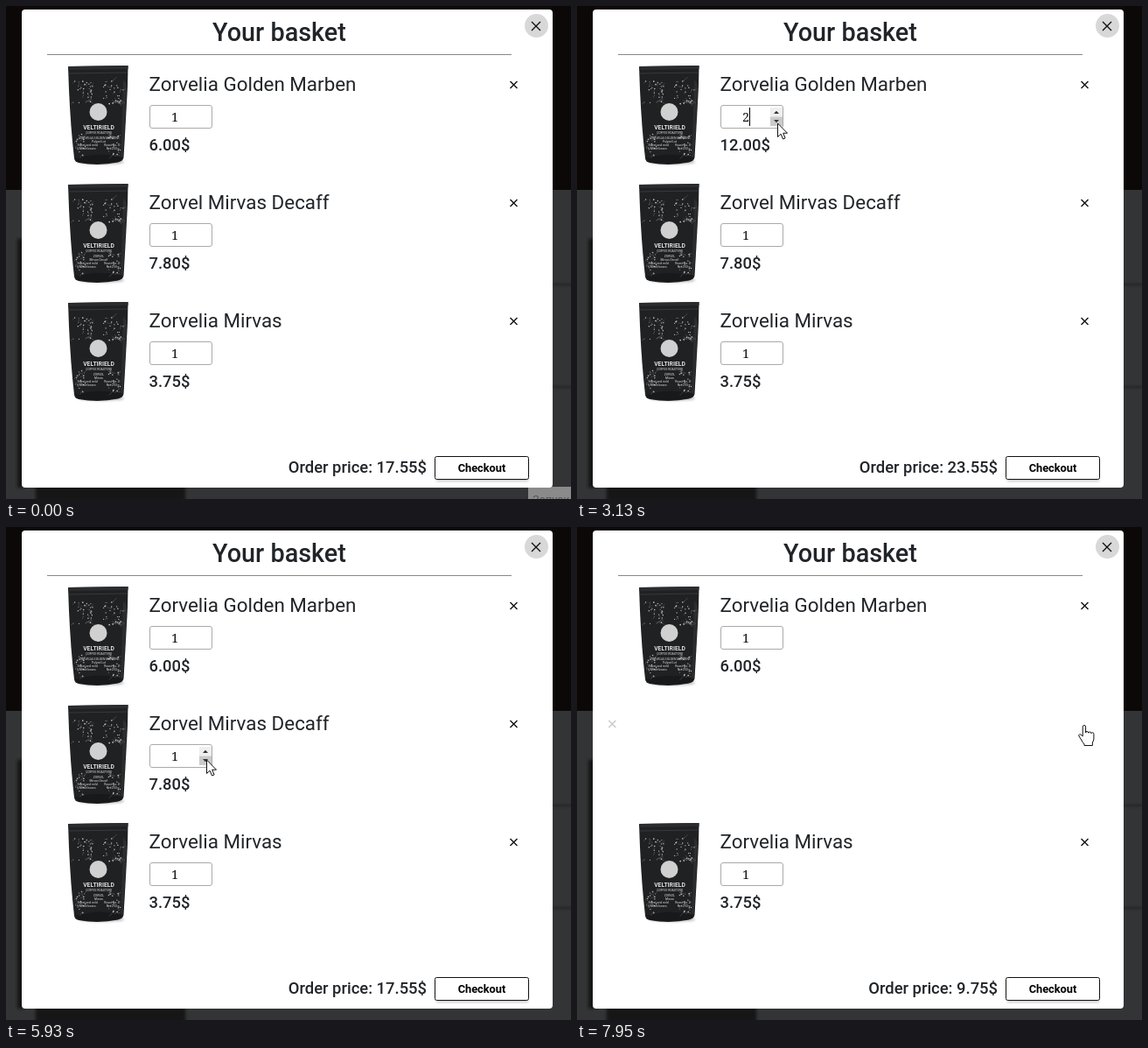
Recreate the animation shown at these times as an HTML page. Size 646x563 px, loop 7990 ms.

```html
<!DOCTYPE html>
<html lang="en">
<head>
<meta charset="utf-8">
<style>
  html, body { margin: 0; width: 100%; height: 100%; overflow: hidden; background: #323435; }
  svg { display: block; font-family: Roboto, sans-serif; fill: #212529; }
  .title { font-size: 28.8px; font-weight: 500; text-anchor: middle; }
  .name { font-size: 22.4px; }
  .price { font-size: 18.4px; font-weight: 500; }
  .qty { font: 14.4px "Noto Serif", serif; text-anchor: middle; fill: #111; }
  .button { font-size: 12.8px; font-weight: 700; text-anchor: middle; fill: #000; }
  .end { text-anchor: end; }
  .cross { stroke: #111; stroke-width: 1.4; fill: none; }
  .label { fill: #ddd; text-anchor: middle; font-size: 3.4px; }
  .brand { font-size: 6.8px; font-weight: 700; }
  .pointer { fill: #fff; stroke: #111; stroke-linejoin: round; }
</style>
</head>
<body>
<svg id="stage" width="646" height="563" viewBox="0 0 646 563"></svg>
<script>
const LOOP = 7990, BLINK = 520, REMOVE = 7500;
const items = [
  { name: 'Zorvelia Golden Marben', label: ['ZORVELIA GOLDEN MARBEN', 'Pulped Lot'], price: 6,
    steps: [[0, 1], [1340, 2], [1890, 3], [2230, 4], [2780, 3], [3080, 2], [3380, 1]] },
  { name: 'Zorvel Mirvas Decaff', label: ['ZORVEL', 'Mirvas Decaff'], price: 7.8,
    steps: [[0, 1], [4550, 2], [5410, 1]] },
  { name: 'Zorvelia Mirvas', label: ['ZORVEL', 'Mirvas'], price: 3.75, steps: [[0, 1]] }
];
const presses = [[1340, 1530], [1890, 1940], [2230, 2290], [2780, 2860], [3080, 3125],
  [3380, 3440], [4550, 4600], [5410, 5490], [7370, 7470]];
// time, x, y, downward bulge of the way there
const path = [[230, 560, 563], [600, 137, 135], [790, 233, 118], [970, 233, 118], [1030, 229.5, 120],
  [2290, 229.5, 120], [2490, 229.5, 134], [3830, 229.5, 134], [4380, 226.5, 254], [4640, 226.5, 254],
  [4900, 229.5, 266], [6190, 229.5, 266], [6980, 580, 227, 24]];

let seed = 7;
const random = () => (seed = seed * 16807 % 2147483647) / 2147483647;
const cross = (x, y, r) => `<path class="cross" d="M${x - r} ${y - r}l${2 * r} ${2 * r}m0 ${-2 * r}l${-2 * r} ${2 * r}"/>`;

function stars(x, y, w, h, count) {
  let out = '', line = '';
  for (let i = 0; i < count; i++) {
    const px = x + random() * w, py = y + random() * h;
    out += `<circle cx="${px}" cy="${py}" r="${.3 + random() * .6}"/>`;
    if (i % 2 == 0) line += `M${px} ${py}l${random() * 10 - 5} ${random() * 10 - 5}`;
  }
  return `<g fill="#c4c4c4">${out}<path d="${line}" stroke="#777" stroke-width=".4"/></g>`;
}
const sky = stars(77, 86, 22, 26, 34) + stars(111, 84, 23, 28, 36) + stars(79, 146, 12, 26, 20) + stars(117, 146, 14, 26, 22);

const small = (x, y, text) => `<text class="label" x="${x}" y="${y}">${text}</text>`;
const bag = label => `
  <ellipse cx="109" cy="178" rx="26" ry="2.5" fill="#aaa" filter="url(#soft)"/>
  <path d="M71 69L139.5 68L139 92Q136.500 140 134.500 173Q134 177 128 178.500Q106 183 83 179Q78.500 178 78 174Q74 140 72 96Z" fill="#202123"/>
  <path d="M71 69L139.5 68V72L71 73Z" fill="#2b2c2e"/>
  <path d="M72 77L138.500 76" stroke="#38393b"/>
  <path d="M134 84Q133 130 131 172L133.500 173Q136.500 130 138 90Z" fill="#2c2d2f"/>
  <path d="M79 174Q106 166 133 173Q133 177 128 178Q106 182 83 178.500Z" fill="#18191a"/>
  ${sky}<circle cx="105.5" cy="121" r="10" fill="#d0d0d0"/>
  <text class="label brand" x="106" y="141">VELTIRIELD</text>
  ${small(106, 145.5, 'COFFEE ROASTERS')}${small(106, 151.5, label[0])}${small(106, 155.5, label[1])}
  ${small(93, 160, 'Sweet and mild')}${small(121, 160, 'Roast No. 4')}
  ${small(93, 164, 'Whole beans')}${small(122, 164, 'Net 250 g')}`;

const row = (item, i) => `<g transform="translate(0 ${i * 135})"><g id="item${i}">
  ${bag(item.label)}
  <text class="name" x="163.5" y="97">${item.name}</text>
  <rect x="164.5" y="113.5" width="71" height="26" rx="2.5" fill="#fff" stroke="#aaa"/>
  <g id="spin${i}">
    <rect id="up${i}" x="221" y="116" width="14" height="10.5"/>
    <rect id="down${i}" x="221" y="126.5" width="14" height="10.5"/>
    <path d="M225 123h6l-3-3.200zM225 130h6l-3 3.200z" fill="#333"/>
  </g>
  <text class="qty" id="qty${i}" x="193" y="132"></text>
  <path id="caret${i}" d="M197.5 116V137" stroke="#000"/>
  <text class="price" id="price${i}" x="163.5" y="165"></text>
  ${cross(580.5, 90, 4)}</g></g>`;

document.getElementById('stage').innerHTML = `
  <defs>
    <filter id="soft" x="-50%" y="-50%" width="200%" height="200%"><feGaussianBlur stdDeviation="1.5"/></filter>
    <clipPath id="modal"><rect x="18" y="4" width="607" height="546" rx="4"/></clipPath>
  </defs>
  <rect width="646" height="563" fill="#323435"/>
  <rect width="646" height="210" fill="#0c0808"/>
  <g filter="url(#soft)" fill="#161718">
    <rect x="13" y="266" width="9" height="284"/><rect x="34" y="545" width="171" height="25"/>
    <path d="M622 318H650M622 435H650" stroke="#222" stroke-width="2"/>
  </g>
  <g id="toast"><rect x="597" y="549" width="49" height="14" fill="#8a8a8a"/>
    <text x="602" y="568" font-size="13" fill="#555">Запуск</text></g>
  <g clip-path="url(#modal)">
    <rect x="18" y="4" width="607" height="546" fill="#fff"/>
    <text class="title" x="312.5" y="40">Your basket</text>
    <path d="M47 55.5H578" stroke="#888"/>
    ${items.map(row).join('')}
    <text class="price end" id="total" x="481" y="533"></text>
    <rect x="492" y="518" width="105" height="25" fill="#ccc" filter="url(#soft)"/>
    <rect x="490.5" y="514.5" width="107" height="26" rx="2" fill="#fff" stroke="#111"/>
    <text class="button" x="544" y="532">Checkout</text>
  </g>
  <circle cx="606.5" cy="22.5" r="13.5" fill="#d8d8d8"/>${cross(606, 23, 5)}
  <circle id="glow" r="12.5" fill="#fff65a" style="mix-blend-mode:multiply"/>
  <path id="arrow" class="pointer" d="M0 0V15.5L3.6 12.2L6 18L8.6 16.9L6.2 11.2H11Z"/>
  <path id="hand" class="pointer" d="M-1.8 12V1.2a1.7 1.7 0 0 1 3.4 0V8q0-1.5 1.6-1.5t1.6 1.7q.1-1.2 1.6-1.2t1.6 1.7q.2-1 1.5-1t1.4 1.8V15q0 2-1.5 4v3.5H0V21q-2-2-4-6l-2-3q-.8-1.6.6-2.2 1.3-.4 2.3 1z"/>`;

const el = id => document.getElementById(id);
const show = (id, on) => el(id).style.display = on ? '' : 'none';
const place = (id, x, y) => el(id).setAttribute('transform', `translate(${x} ${y})`);
const smooth = u => (u = Math.min(1, Math.max(0, u)), u * u * (3 - 2 * u));
const money = value => value.toFixed(2) + '$';

function pointerAt(t) {
  const n = path.findIndex(key => key[0] > t);
  if (n < 0) return path[path.length - 1].slice(1, 3);
  const b = path[n], a = path[Math.max(0, n - 1)];
  const p = smooth((t - a[0]) / (b[0] - a[0] || 1));
  return [a[1] + (b[1] - a[1]) * p, a[2] + (b[2] - a[2]) * p + (b[3] || 0) * 4 * p * (1 - p)];
}

function draw(t) {
  const [x, y] = pointerAt(t);
  const pressed = presses.some(([from, to]) => t >= from && t < to);
  const focus = t < 1340 ? -1 : t < 4550 ? 0 : t < 7370 ? 1 : -1;
  let total = 0;

  items.forEach((item, i) => {
    const [since, qty] = item.steps.filter(step => step[0] <= t).pop();
    const top = 113 + i * 135;
    const over = t >= 230 && x >= 164 && x < 236 && y >= top && y < top + 27;
    const shade = on => !on ? '#efefef' : pressed ? '#a5a5a5' : '#cacaca';
    const onSpin = over && x > 220;
    el('qty' + i).textContent = qty;
    el('price' + i).textContent = money(qty * item.price);
    show('spin' + i, over || focus == i || (i == 1 && t >= 7370));
    el('up' + i).setAttribute('fill', shade(onSpin && y < top + 12));
    el('down' + i).setAttribute('fill', shade(onSpin && y >= top + 12));
    show('caret' + i, focus == i && Math.floor((t - since) / BLINK) % 2 == 0);
    if (i != 1 || t < REMOVE) total += qty * item.price;
  });
  el('total').textContent = 'Order price: ' + money(total);

  const gone = smooth((t - REMOVE) / 650);
  place('item1', -696 * gone, 0);
  el('item1').setAttribute('opacity', 1 - gone);

  const onCross = x > 571 && y < 240 && t > 6190;
  show('toast', t < 20);
  show('glow', pressed);
  show('arrow', t >= 230 && !onCross);
  show('hand', onCross);
  ['glow', 'arrow', 'hand'].forEach(id => place(id, x, y));
}

const start = performance.now();
function tick() {
  draw((performance.now() - start) % LOOP);
  requestAnimationFrame(tick);
}
tick();
</script>
</body>
</html>
```
